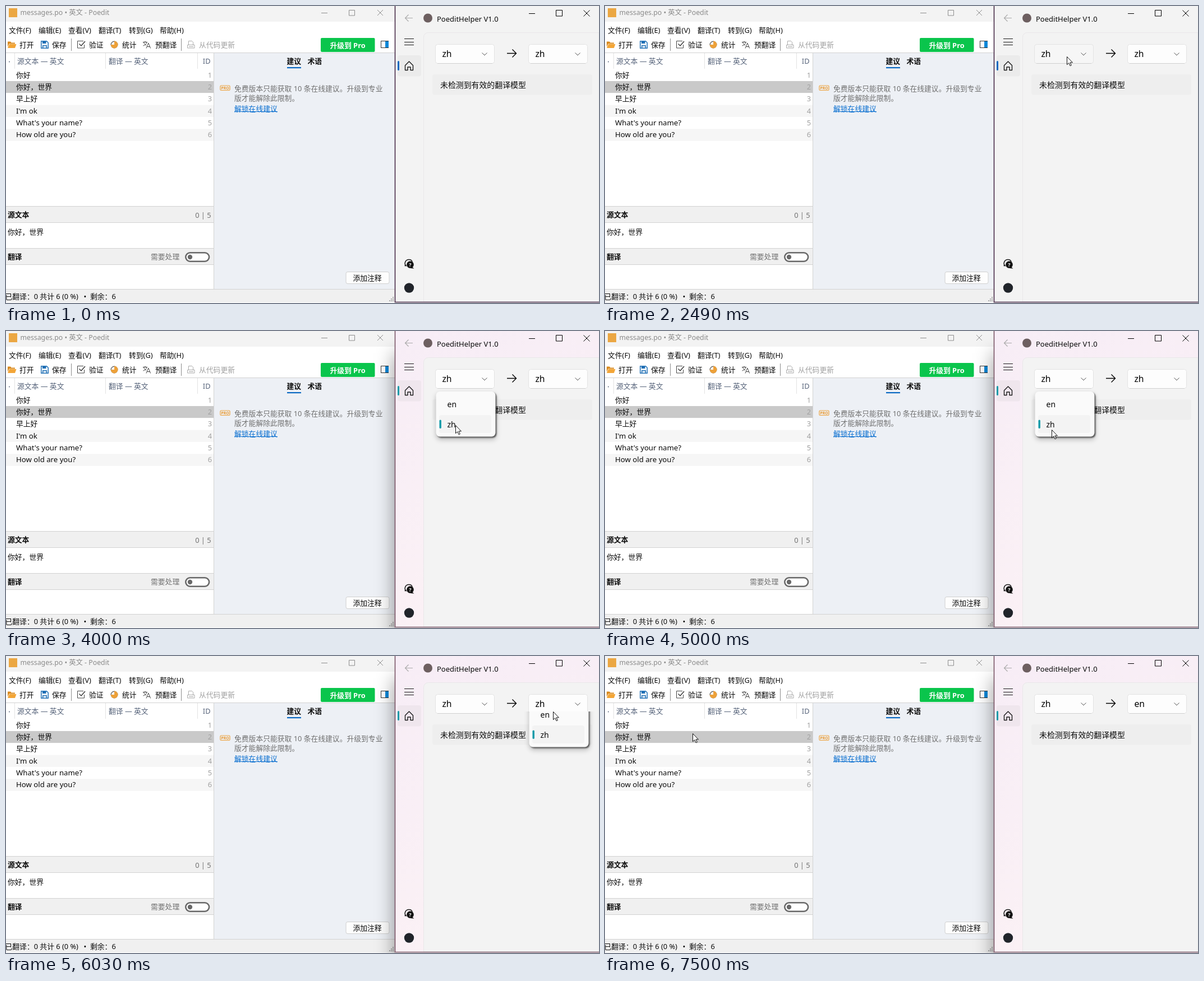
These frames come from a looping animation (1057x530 px, 8 s). An HTML page:

```html
<!DOCTYPE html>
<html lang="zh-CN">
<head>
<meta charset="utf-8">
<title>PoeditHelper</title>
<style>
html, body { margin: 0; width: 100%; height: 100%; overflow: hidden; background: #fff; }
svg { display: block; width: 1057px; height: 530px; }
text { font: 12.8px "Noto Sans", "Noto Sans CJK SC", "Noto Sans CJK", sans-serif; fill: #0a0a0a; white-space: pre; }
.b { font-weight: 700; }
.g { fill: #707070; }
.l { fill: #a0a0a0; }
.h { fill: #56637a; }
.r text { font-size: 13.2px; }
.end { text-anchor: end; }
.mid { text-anchor: middle; }
.ln { fill: none; stroke: #1a1a1a; }
.edge { fill: none; stroke: #d2d2d2; }
.combo text { font-size: 15.7px; font-weight: 500; fill: #000; }
.menu text { font-size: 14px; }
.menu { filter: drop-shadow(2px 2.5px 1px rgba(0,0,0,.6)) drop-shadow(0 4px 4px rgba(0,0,0,.24)); }
#shadow { filter: blur(17px); }
</style>
</head>
<body>
<svg viewBox="0 0 1057 530" xmlns="http://www.w3.org/2000/svg">
<defs>
  <linearGradient id="mica" x1="0" y1="0" x2=".3" y2="1">
    <stop offset="0" stop-color="#f7edf6"/>
    <stop offset="1" stop-color="#fbf1f5"/>
  </linearGradient>
  <clipPath id="reveal"><rect x="693" y="99" width="364" height="431"/></clipPath>
</defs>

<!-- editor window -->
<rect width="693" height="530" fill="#fff"/>
<rect width="693" height="28" fill="#f3f3f3"/>
<rect x="5" y="4" width="15" height="16" fill="#eba743"/>
<text x="25.5" y="16" style="font-size:12.3px;fill:#8a8a8a">messages.po • 英文 - Poedit</text>
<path class="ln" style="stroke:#8d8d8d" d="M562 12.500h11M611.500 7.500h10v9.500h-10zM662 7l10 10M672 7l-10 10"/>
<g id="menubar"></g>

<!-- toolbar -->
<path d="M3 63.500h5l1.500 2H16v2H5.500L3 73z" fill="#d98a1f"/>
<path d="M6 68h12.500L16 75H3z" fill="#f3a638"/>
<text x="24" y="73.500">打开</text>
<path d="M62.800 62.800h9.700l2.700 2.700v9.700H62.800z" fill="#fff" stroke="#1f6fb5" stroke-width="1.500"/>
<path d="M65 63h6.500v4H65zM65 70h8v5h-8z" fill="#1f6fb5"/>
<path d="M66.500 71.500h5v3h-5z" fill="#fff"/>
<text x="82" y="73.500">保存</text>
<path d="M116.500 58v22M312.500 58v22" stroke="#8c8c8c"/>
<path class="ln" d="M138 62.500h-10.500v12.500h12v-6" style="stroke:#444"/>
<path class="ln" d="M130.500 67.500l3.500 3.500 7-8" style="stroke:#333;stroke-width:1.400"/>
<text x="148" y="73.500">验证</text>
<circle cx="193" cy="69" r="5.800" fill="#fff" stroke="#555" stroke-width="1.200"/>
<path d="M193 69V62.500a6.500 6.500 0 0 1 0 13 6.500 6.500 0 0 1-6.300-6.500z" fill="#eda13a"/>
<text x="207" y="73.500">统计</text>
<path class="ln" style="stroke:#444" d="M244 64.500h8M248 62.500v2M251 65c-1 3-3.500 5-6.500 6M245.500 65c1 2.500 2.500 4 4.500 5M250 75.500l3.800-9.500 3.800 9.500M251.500 72.500h4.700"/>
<text x="266" y="73.500">预翻译</text>
<path class="ln" style="stroke:#aaa" d="M325.500 69v-6.500h6l2 2V69M323.500 69.500h12.500v5.500h-12.500zM326 72.500h8"/>
<text x="344" y="73.500" class="l">从代码更新</text>
<rect x="561" y="57" width="96.500" height="25" rx="2" fill="#0ac54c"/>
<text x="609" y="74.500" class="b mid" style="fill:#fff">升级到 Pro</text>
<rect x="668.500" y="62.500" width="13" height="12" fill="#fff" stroke="#333"/>
<rect x="676" y="63" width="6" height="11" fill="#0f87d8"/>

<!-- list -->
<rect x="371" y="84" width="322" height="421" fill="#edf0f5"/>
<g id="list"></g>
<path class="edge" d="M0 83.500h693M370.500 84v421"/>
<path d="M15.500 84v28M177.500 84v28M341.500 84v28" stroke="#e3e3e3"/>
<circle cx="6" cy="99.500" r=".9" fill="#56637a"/>
<text x="20" y="103" class="h">源文本 — 英文</text>
<text x="183" y="103" class="h">翻译 — 英文</text>
<text x="364.500" y="103" class="h end">ID</text>

<!-- text panes -->
<rect y="357" width="370" height="29.500" fill="#f0f0f0"/>
<rect y="432" width="370" height="29.500" fill="#f0f0f0"/>
<rect y="505" width="693" height="24" fill="#f0f0f0"/>
<path class="edge" d="M0 357.500h370M0 386.500h370M0 432.500h370M0 461.500h370M0 505.500h693"/>
<text x="3" y="377" class="b">源文本</text>
<text x="365.500" y="377.500" class="g end">0 | 5</text>
<text x="3" y="407.500">你好，世界</text>
<text x="3" y="452" class="b">翻译</text>
<text x="258" y="452" class="g" style="font-weight:500">需要处理</text>
<rect x="320.300" y="440.300" width="41.800" height="15.400" rx="7.700" fill="#fff" stroke="#696969" stroke-width="2.600"/>
<circle cx="328" cy="448" r="4.200" fill="#696969"/>
<text x="-1.500" y="523">已翻译：0 共计 6 (0 %)</text>
<text x="138.500" y="523">•</text>
<text x="150" y="523">剩余：6</text>
<path d="M689 519h2v2h-2zM686 522h2v2h-2zM689 522h2v2h-2zM683 525h2v2h-2zM686 525h2v2h-2zM689 525h2v2h-2z" fill="#a9a9a9"/>

<!-- suggestions -->
<text x="500.500" y="102.500" class="b">建议</text>
<text x="537.500" y="102.500" class="b">术语</text>
<rect x="501" y="109" width="25" height="2.200" fill="#0a69c2"/>
<rect x="382" y="142" width="17" height="8.500" rx="1.500" fill="none" stroke="#eda13a" stroke-width="1.200"/>
<text x="390.600" y="149" class="b mid" style="font-size:6.800px;fill:#e8962c">PRO</text>
<text x="407" y="151.500" class="g">免费版本只能获取 10 条在线建议。升级到专业</text>
<text x="407" y="169" class="g">版才能解除此限制。</text>
<text x="407" y="187.500" style="fill:#0a6fd0">解锁在线建议</text>
<path d="M407 188.500h77" stroke="#0a6fd0"/>
<rect x="606" y="474.500" width="77" height="21" rx="3" fill="#fdfdfd" stroke="#d0d0d0"/>
<text x="644" y="490" class="mid">添加注释</text>

<!-- helper window -->
<rect id="shadow" x="693" y="40" width="364" height="530" fill-opacity=".42"/>
<rect id="win" x="693" width="364" height="528" fill="#f3f3f3"/>
<path d="M744.500 528V55.500a8 8 0 0 1 8-8H1057V528z" fill="#f3f3f3" stroke="#e9e7e9"/>
<path id="frame" d="M693.500 0v528.500H1057" fill="none" stroke-width="1.600"/>
<path d="M693 529.500h364" stroke="#d9d5d9"/>
<circle cx="752" cy="21.500" r="8" fill="#6d5f60"/>
<text x="768" y="27.500" style="font-size:13px">PoeditHelper V1.0</text>
<path class="ln" style="stroke:#000" d="M932 13.500h11M980.500 7.500h11v10.500h-11zM1029.500 7.500l11 11M1040.500 7.500l-11 11"/>
<path class="ln" style="stroke:#aaa;stroke-width:1.200" d="M725 21.500h-13.500M717.500 15.500l-6 6 6 6"/>
<path class="ln" d="M710 58.500h17M710 64.500h17M710 69.500h17" style="stroke-width:1.200"/>
<rect id="home" x="698" y="88" width="42" height="37.500" rx="4"/>
<rect class="accent" x="698" y="98" width="3" height="17" rx="1.500"/>
<path class="ln" style="stroke-width:1.400;stroke-linejoin:round" d="M711.500 106l7-7 7 7v8.500h-4.500v-5.500h-5v5.500h-4.500z"/>
<path d="M712 463.500c-2.500-6 1-11 6-11s6 3 6 5" class="ln" style="stroke-width:1.500"/>
<path d="M710 464l2.500-3 2 3.500z" fill="#1a1a1a"/>
<circle cx="720.500" cy="461.500" r="6.300" fill="#111"/>
<path d="M723 465l4.500 3.500-6.500-.5z" fill="#111"/>
<text x="720.500" y="465" class="b mid" style="font-size:9px;fill:#fff">?</text>
<circle cx="718.500" cy="503" r="8.700" fill="#20242a"/>

<rect id="card" x="760" y="122" width="285" height="36.500" rx="4"/>
<text x="774" y="145.500" style="font-size:13.9px">未检测到有效的翻译模型</text>
<path class="ln" style="stroke:#000;stroke-width:1.400" d="M893 84.500h16.500M902.500 77.500l7 7-7 7"/>
<g class="combo" id="combos"></g>

<g id="clip"><g id="slide"><g class="menu">
  <rect x="766.500" y="108" width="106" height="80.500" rx="7" fill="#fafafa"/>
  <rect id="hover" x="772" y="114.500" width="93" height="31.500" rx="4" fill="#f0f0f0"/>
  <rect x="772" y="150" width="93" height="32" rx="4" fill="#f3f3f3"/>
  <rect class="accent" x="772.500" y="158.500" width="3.400" height="15.500" rx="1.700"/>
  <text x="786.500" y="135.800">en</text>
  <text x="786.500" y="172">zh</text>
</g></g></g>

<path id="cursor" d="M.5.500v14.200l3.200-3 2.400 5.100 2.200-1-2.400-4.900h4.500z" fill="#fff" stroke="#111" stroke-linejoin="round"/>
</svg>
<script>
const LOOP = 8000;
const $ = id => document.getElementById(id);

const menus = [[5, "文件(F)"], [58, "编辑(E)"], [111, "查看(V)"], [165, "翻译(T)"], [219, "转到(G)"], [274, "帮助(H)"]];
$("menubar").innerHTML = menus.map(([x, s]) => `<text x="${x}" y="48">${s}</text>`).join("");

const rows = ["你好", "你好，世界", "早上好", "I'm ok", "What's your name?", "How old are you?"];
$("list").innerHTML = rows.map((s, i) => {
  const y = 112.6 + 21.35 * i;
  const fill = i === 1 ? "#c9c9c9" : i % 2 ? "#f6f6f6" : "#fff";
  return `<rect y="${y}" width="370" height="21.35" fill="${fill}"/>
    <g${i > 2 ? ' class="r"' : ""}><text x="18" y="${y + 15}">${s}</text></g>
    <text x="367" y="${y + 15}" class="l end">${i + 1}</text>`;
}).join("");

const combo = (x, id) => `<rect id="${id}" x="${x + .5}" y="68.500" width="105" height="34" rx="4" fill="#fdfdfd" stroke="#e3e3e3"/>
  <path d="M${x + 4} 102.500h98" stroke="#cfcfcf"/>
  <text id="${id}Text" x="${x + 12.5}" y="91.300">zh</text>
  <path class="ln" style="stroke:#555" d="M${x + 83.5} 83.500l4.500 4.500 4.500-4.500"/>`;
$("combos").innerHTML = combo(765, "from") + combo(931, "to");

// Each step holds until the next: start time, pointer position, and what is open or hovered.
const steps = [
  { t: 0 },
  { t: 990, at: [950, 480] },
  { t: 1500, at: [561, 200] },
  { t: 2000, at: [788, 132], card: true },
  { t: 2490, at: [823, 90], combo: true },
  { t: 3000, at: [823, 90], menu: "from", opening: true },
  { t: 3490, at: [807, 129], menu: "from", hover: true },
  { t: 4000, at: [801, 168], menu: "from" },
  { t: 4490, at: [978, 90], menu: "from" },
  { t: 5000, at: [796, 176], menu: "from" },
  { t: 5500, at: [884, 125], card: true },
  { t: 6030, at: [975, 99], menu: "to", opening: true },
  { t: 6510, at: [975, 133], menu: "to", hover: true },
  { t: 7010, at: [615, 118] },
  { t: 7500, at: [156, 138] }
];

const set = (id, name, value) => $(id).setAttribute(name, value);
const show = (id, on) => set(id, "visibility", on ? "inherit" : "hidden");

function draw(t) {
  const s = steps.filter(step => step.t <= t).pop();
  const active = t >= 3000;
  show("shadow", active);
  set("win", "fill", active ? "url(#mica)" : "#f3f3f3");
  set("frame", "stroke", active ? "#7a5566" : "#482b48");
  set("home", "fill", active ? "#efe6ed" : "#ebebeb");
  for (const el of document.querySelectorAll(".accent"))
    el.setAttribute("fill", active ? "#0b9aa8" : "#0067c0");
  set("card", "fill", s.card ? "#dddddd" : "#eeeeee");
  set("from", "fill", s.combo ? "#f6f6f6" : "#fdfdfd");
  $("toText").textContent = t >= 7010 ? "en" : "zh";

  show("clip", s.menu);
  show("hover", s.hover);
  set("clip", "clip-path", s.opening ? "url(#reveal)" : "none");
  set("slide", "transform", `translate(${s.menu === "to" ? 166 : 0} ${s.opening ? -26 : 0})`);

  show("cursor", s.at);
  if (s.at) set("cursor", "transform", `translate(${s.at})`);
}

const start = performance.now();
function tick() {
  draw((performance.now() - start) % LOOP);
  requestAnimationFrame(tick);
}
tick();
</script>
</body>
</html>
```
